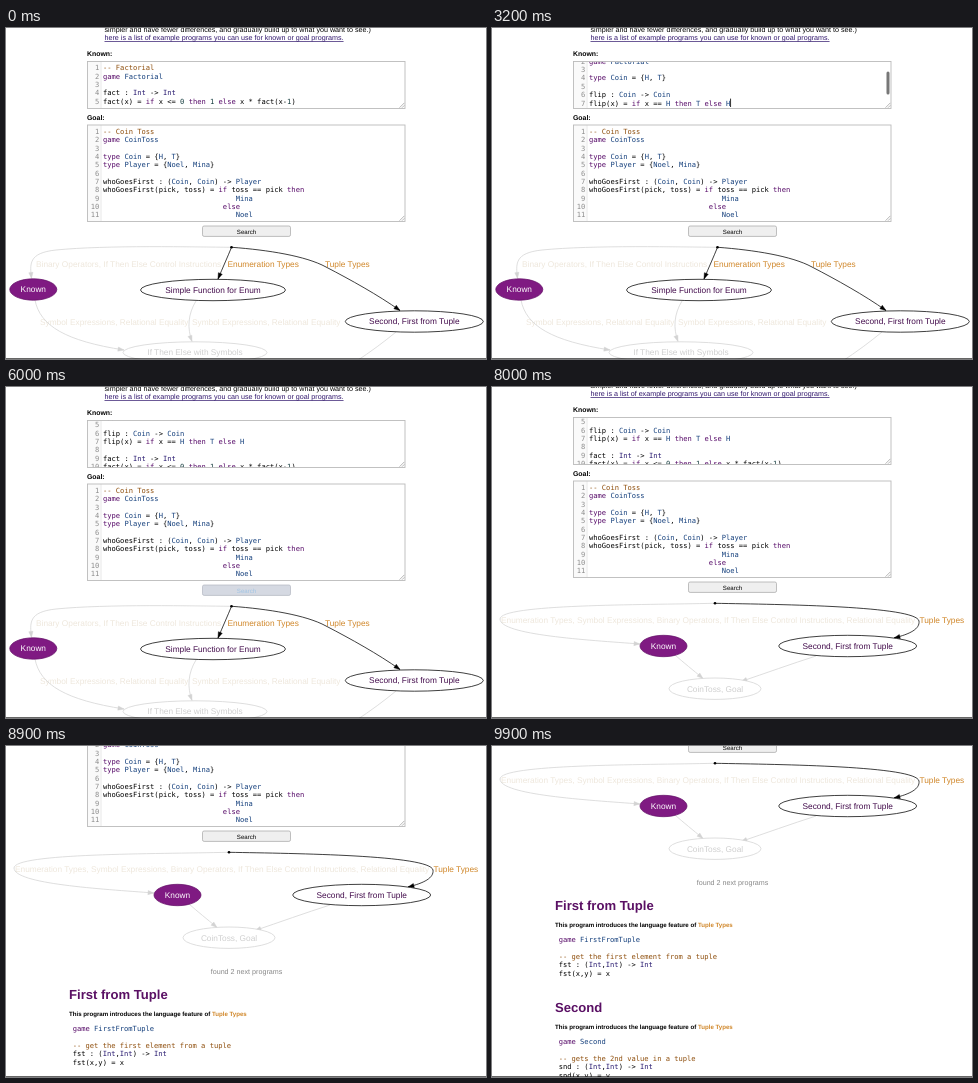
These frames come from a looping animation (480x331 px, 10 s). An HTML page:

```html
<!DOCTYPE html>
<html lang="en">
<head>
<meta charset="utf-8">
<title>Program search</title>
<style>
  html, body { margin: 0; width: 100%; height: 100%; overflow: hidden; background: #fff; }
  #stage { display: block; width: 100vw; height: 100vh; }
  text { font-family: "Liberation Sans", Arial, sans-serif; font-size: 8.3px; text-rendering: geometricPrecision; white-space: pre; }
  .code { font-family: "DejaVu Sans Mono", monospace; font-size: 7.11px; }
  .small { font-size: 7.16px; }
  .label { font-size: 6.9px; font-weight: bold; }
  .note { font-size: 6.14px; font-weight: bold; }
  .title { font-size: 13.1px; font-weight: bold; fill: #5a1064; }
  .link { fill: #32186e; text-decoration: underline; }
  .number { fill: #8c8c8c; text-anchor: end; }
  .faint { fill: #eee7dc; }
  .feature { fill: #d0872a; }
  .middle { text-anchor: middle; }
</style>
</head>
<body>
<svg id="stage" viewBox="0 0 480 331">
  <g id="page"></g>
  <rect y="330" width="480" height="1" opacity=".6"/>
</svg>
<script>
const DURATION = 10000;
const LINE = 8.35, CHAR = 4.28;
const GREY = '#d3d3d3', BLACK = '#000', PURPLE = '#7f1a82';

const clamp = v => Math.max(0, Math.min(1, v));
const progress = (t, start, end) => clamp((t - start) / (end - start));
const lerp = (a, b, p) => a + (b - a) * p;
const mix = (a, b, p) => a.map((v, i) => lerp(v, b[i], p));
const sine = p => (1 - Math.cos(Math.PI * p)) / 2;
const cubic = p => p < .5 ? 4 * p ** 3 : 1 - (2 - 2 * p) ** 3 / 2;

function set(el, attrs) {
  for (const name in attrs) el.setAttribute(name, attrs[name]);
  return el;
}
function add(parent, tag, attrs = {}) {
  const el = document.createElementNS('http://www.w3.org/2000/svg', tag);
  parent.append(el);
  return set(el, attrs);
}
function write(parent, x, y, content, cls = '', attrs = {}) {
  const el = add(parent, 'text', { x, y, class: cls, ...attrs });
  el.textContent = content;
  return el;
}

// Code with syntax colours
const TOKENS = /(--.*)|\b(game|type|if|then|else)\b|\b(Int)\b|\b([A-Z]\w*)|\b(\d+)\b/g;
const TOKEN_COLORS = ['#8e4e0c', '#560a68', '#281a70', '#143f7c', '#123a3c'];
function writeCode(parent, x, y, line) {
  const el = write(parent, x, y, '', 'code');
  let end = 0;
  for (const match of line.matchAll(TOKENS)) {
    el.append(line.slice(end, match.index));
    const kind = match.slice(1).findIndex(Boolean);
    add(el, 'tspan', { fill: TOKEN_COLORS[kind] }).textContent = match[0];
    end = match.index + match[0].length;
  }
  el.append(line.slice(end));
}

function editor(y, height) {
  const box = add(page, 'svg', { x: 81.5, y, width: 317.5, height });
  add(box, 'rect', { width: 13.6, height, fill: '#fafafa' });
  add(box, 'path', { d: `M13.6 0V${height}`, stroke: '#ddd', 'stroke-width': .6 });
  const content = add(box, 'g');
  add(page, 'rect', { x: 81.5, y, width: 317.5, height, fill: 'none', stroke: '#bbb', 'stroke-width': .9 });
  add(page, 'path', {
    d: `M393.5 ${y + height - .8}l4.8 -4.8M396 ${y + height - .8}l2.3 -2.3`,
    stroke: '#888', 'stroke-width': .6
  });
  return { box, content };
}
function fill(content, lines) {
  content.replaceChildren();
  lines.forEach((line, i) => {
    const y = 8.9 + i * LINE;
    write(content, 11.7, y, i + 1, 'code number');
    writeCode(content, 15.5, y, line);
  });
}

const page = document.getElementById('page');

write(page, 98.5, 3.8, 'simpler and have fewer differences, and gradually build up to what you want to see.)', 'small');
write(page, 98.5, 12.2, 'here is a list of example programs you can use for known or goal programs.', 'small link');
write(page, 81, 27.6, 'Known:', 'label');
write(page, 81, 92.2, 'Goal:', 'label');

const head = ['-- Factorial', 'game Factorial'];
const fact = ['', 'fact : Int -> Int', 'fact(x) = if x <= 0 then 1 else x * fact(x-1)'];
const flip = ['type Coin = {H, T}', '', 'flip : Coin -> Coin', 'flip(x) = if x == H then T else H'];
const edits = [
  { at: 0, lines: [...head, ...fact], caret: [14, 1], shown: [1500, 1900] },
  { at: 2200, lines: [...head, '', ...fact], caret: [0, 2], shown: [2200, 2700] },
  { at: 2700, lines: [...head, '', '', ...fact], caret: [0, 3], shown: [2700, 3200] },
  { at: 3200, lines: [...head, '', ...flip, ...fact], caret: [33, 6], shown: [3200, 3700] }
];

const known = editor(33.5, 47);
const caret = add(known.box, 'rect', { width: .8, height: 8.4 });
const thumb = add(known.box, 'rect', { x: 313, width: 3, height: 23, rx: 1.5, fill: '#777' });

const goal = editor(97, 96.5);
fill(goal.content, [
  '-- Coin Toss', 'game CoinToss', '', 'type Coin = {H, T}', 'type Player = {Noel, Mina}', '',
  'whoGoesFirst : (Coin, Coin) -> Player', 'whoGoesFirst(pick, toss) = if toss == pick then',
  ' '.repeat(31) + 'Mina', ' '.repeat(28) + 'else', ' '.repeat(31) + 'Noel'
]);

const button = add(page, 'rect', { x: 196.5, y: 198, width: 88, height: 10.4, rx: 1.6, 'stroke-width': .7 });
const buttonText = write(page, 240.5, 205.6, 'Search', 'middle', { style: 'font-size:6.1px' });

// Graph: parts that exist in both layouts move, the others fade
const graph = add(page, 'g');
const leaving = add(graph, 'g'), entering = add(graph, 'g'), staying = add(graph, 'g');
const morphs = [];

function edge(parent, color, from, to = from) {
  const curve = add(parent, 'path', { fill: 'none', stroke: color, 'stroke-width': .75 });
  const arrow = add(parent, 'path', { fill: color, stroke: color, 'stroke-width': .4 });
  morphs.push(p => {
    const pts = mix(from, to, p);
    const [cx, cy, x, y] = pts.slice(-4);
    const angle = Math.atan2(y - cy, x - cx) * 180 / Math.PI;
    set(curve, { d: `M${pts.slice(0, 2)}C${pts.slice(2)}` });
    set(arrow, { d: 'M0 0L-6 -2.1V2.1Z', transform: `translate(${x} ${y}) rotate(${angle})` });
  });
}
function node(parent, label, rx, colors, from, to = from) {
  const g = add(parent, 'g');
  const [background, stroke, color] = colors;
  add(g, 'ellipse', { rx, ry: 10.7, fill: background, stroke, 'stroke-width': .75 });
  write(g, 0, 2.9, label, 'middle', { fill: color });
  morphs.push(p => set(g, { transform: `translate(${mix(from, to, p)})` }));
}
const plain = ['#fff', BLACK, '#430c4c'];
const pale = ['#fff', GREY, '#cfcfcf'];

const equality = 'Symbol Expressions, Relational Equality';
const control = 'Binary Operators, If Then Else Control Instructions';
write(leaving, 30, 239, control, 'faint');
write(leaving, 34, 296.5, equality, 'faint');
write(leaving, 186, 296.5, equality, 'faint');
write(leaving, 221.5, 239, 'Enumeration Types', 'feature');
edge(leaving, BLACK, [225.5, 219.3, 222, 228, 217, 239, 212, 251]);
edge(leaving, GREY, [29, 272, 34, 298, 60, 313, 118, 322]);
edge(leaving, GREY, [190, 273, 182, 286, 181, 300, 186, 313.5]);
node(leaving, 'Simple Function for Enum', 72.5, plain, [207, 262]);
node(leaving, 'If Then Else with Symbols', 72, pale, [189, 324.5]);

write(entering, 9, 239, 'Enumeration Types, Symbol Expressions, ' + control + ', Relational Equality', 'faint');
edge(entering, GREY, [183, 271, 192, 279, 201, 286, 211, 294.5]);

edge(staying, GREY,
  [225, 219.3, 190, 219, 100, 217, 50, 222, 22, 225, 24, 236, 25.5, 250.5],
  [222, 219.3, 150, 221, 8, 220, 8, 235, 8, 251, 95, 256, 148, 260]);
edge(staying, BLACK,
  [226, 219.3, 262, 222, 300, 228, 320, 239, 345, 252, 372, 267, 394, 282.5],
  [223, 219.3, 290, 220.5, 424, 222, 427, 237, 428, 245, 418, 250, 402, 254]);
edge(staying, GREY,
  [390, 304, 367, 323, 335, 345, 300, 362],
  [324, 272, 299, 280, 274, 289, 249, 297.5]);
const tuple = write(staying, 319, 239, 'Tuple Types', 'feature');
const root = add(staying, 'circle', { cy: 219.3, r: 1.3 });
node(staying, 'Known', 23.5, [PURPLE, '#651068', '#fff'], [27.3, 261.5], [171.5, 262]);
node(staying, 'Second, First from Tuple', 69, plain, [408.3, 293.5], [355.7, 262]);
node(staying, 'CoinToss, Goal', 46, pale, [268, 370], [223, 304.7]);

// Results below the graph
write(page, 240.5, 341, 'found 2 next programs', 'small middle', { fill: '#888' });
function result(y, title, lines) {
  write(page, 63, y, title, 'title');
  const note = write(page, 63, y + 16.8, 'This program introduces the language feature of ', 'note');
  add(note, 'tspan', { class: 'feature' }).textContent = 'Tuple Types';
  lines.forEach((line, i) => writeCode(page, 66.7, y + 32 + i * LINE, line));
}
result(366.4, 'First from Tuple', [
  'game FirstFromTuple', '', '-- get the first element from a tuple', 'fst : (Int,Int) -> Int', 'fst(x,y) = x'
]);
result(468.2, 'Second', [
  'game Second', '', '-- gets the 2nd value in a tuple', 'snd : (Int,Int) -> Int', 'snd(x,y) = y'
]);

let currentEdit;
function drawKnown(t) {
  const edit = edits.findLast(e => t >= e.at);
  if (edit !== currentEdit) fill(known.content, edit.lines);
  currentEdit = edit;
  const scroll = t < 3200 ? 0 : lerp(15, 35.5, sine(progress(t, 3650, 4150)));
  const [column, row] = edit.caret;
  const [on, off] = edit.shown;
  set(known.content, { transform: `translate(0 ${-scroll})` });
  set(caret, {
    x: 15.5 + column * CHAR, y: 2 + row * LINE - scroll,
    opacity: t >= on && t < off ? 1 : 0
  });
  set(thumb, {
    y: .5 + scroll / 35.5 * 22.5,
    opacity: t < 3200 ? 0 : 1 - progress(t, 4650, 5000)
  });
}

function drawButton(t) {
  const press = t < 6400 ? progress(t, 5250, 5550) : 0;
  const rgb = (a, b) => `rgb(${mix(a, b, press)})`;
  set(button, { fill: rgb([239, 239, 239], [213, 217, 226]), stroke: rgb([165, 165, 165], [178, 182, 192]) });
  set(buttonText, { fill: rgb([0, 0, 0], [160, 196, 228]) });
}

function drawGraph(t) {
  const p = cubic(progress(t, 6350, 7400));
  morphs.forEach(update => update(p));
  set(leaving, { opacity: 1 - p });
  set(entering, { opacity: p });
  set(tuple, { x: lerp(319, 427.5, p) });
  set(root, { cx: lerp(225.5, 223, p) });
}

function draw(t) {
  drawKnown(t);
  drawButton(t);
  drawGraph(t);
  const scroll = Math.round(202 * sine(progress(t, 7850, 9800)));
  set(page, { transform: `translate(0 ${-scroll})` });
}

const start = performance.now();
function frame() {
  draw((performance.now() - start) % DURATION);
  requestAnimationFrame(frame);
}
frame();
</script>
</body>
</html>
```
